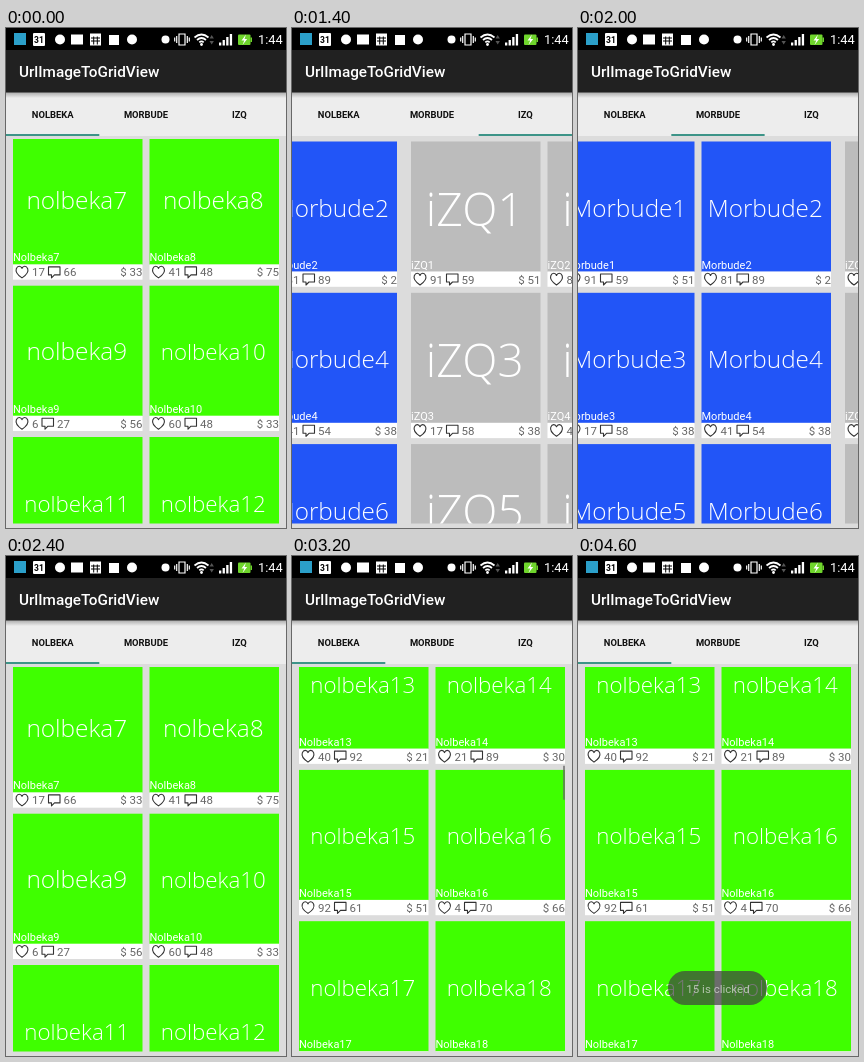
Animation, 280 px wide and 500 px high, one loop 4.8 s. Source, as an HTML page:

```html
<!DOCTYPE html>
<html lang="en">
<head>
<meta charset="utf-8">
<title>UrlImageToGridView</title>
<style>
  html, body { margin: 0; width: 100%; height: 100%; overflow: hidden; background: #dcdcdc; }
  svg { display: block; width: 100vw; height: 100vh; }
  text { font-family: Roboto, sans-serif; }
  .big { font-family: "Open Sans", "Noto Sans", sans-serif; font-weight: 300; fill: #fff; text-anchor: middle; }
  .cap { font-size: 11px; fill: #fff; }
  .stat { font-size: 11.5px; fill: #666; }
  .icon { fill: none; stroke: #333; stroke-width: 1.1; stroke-linejoin: round; }
  .tab { font-size: 9.4px; font-weight: 700; fill: #111; text-anchor: middle; }
</style>
</head>
<body>
<svg viewBox="0 0 280 500" preserveAspectRatio="none">
  <defs>
    <clipPath id="list"><rect y="111" width="280" height="384.5"/></clipPath>
    <linearGradient id="shade" x1="0" y1="0" x2="0" y2="1">
      <stop offset="0" stop-color="#a8a8a8"/>
      <stop offset="1" stop-color="#ededed"/>
    </linearGradient>
  </defs>
  <rect width="280" height="500" fill="#dcdcdc"/>
  <g clip-path="url(#list)">
    <g id="pages"></g>
    <rect id="bar" x="271" width="2" height="34" fill="#666"/>
  </g>

  <rect y="64" width="280" height="44" fill="#ededed"/>
  <rect y="64" width="280" height="6" fill="url(#shade)"/>
  <g id="tabs"></g>
  <rect id="mark" y="106" width="93.3" height="2" fill="#3d9488"/>

  <rect width="280" height="22" fill="#000"/>
  <rect y="22" width="280" height="42.5" fill="#212121"/>
  <text x="13" y="49" font-size="15.3" font-weight="500" fill="#fff">UrlImageToGridView</text>

  <g fill="#fff">
    <rect x="8" y="5" width="12" height="12" fill="#2b9fc9"/>
    <rect x="27" y="5" width="12" height="13" rx="1"/>
    <text x="33" y="15" font-size="8.5" font-weight="700" fill="#000" text-anchor="middle">31</text>
    <circle cx="54" cy="11.5" r="5"/>
    <rect x="65" y="6.5" width="12" height="10"/>
    <path d="M84 5.5h11v12h-11z"/>
    <path d="M85 10h9M85 13h9M87.7 8.5v8M91.3 8.5v8" stroke="#000" fill="none"/>
    <rect x="103" y="7" width="10" height="10"/>
    <circle cx="126" cy="11.5" r="5"/>
    <circle cx="159.5" cy="11.5" r="4"/>
    <path d="M173 6h6v11h-6zM170.7 8v7M181.3 8v7M168.7 9.5v4M183.3 9.5v4" fill="none" stroke="#fff" stroke-width="1.2"/>
    <path d="M188.5 9.5q7-6 14 0M191 12q4.500-4 9 0M193.300 14.300q2.200-2 4.400 0" fill="none" stroke="#fff" stroke-width="1.7"/>
    <circle cx="195.500" cy="16.500" r="1.400"/>
    <path d="M203.500 10.500l2.200-3.500 2.200 3.500zM203.500 13l2.200 3.500 2.200-3.500z" fill="#555"/>
    <path d="M213 14.500h2.300v3h-2.300zM216.600 12h2.300v5.500h-2.300zM220.200 9h2.300v8.500h-2.300zM223.800 6h2.300v11.500h-2.300z"/>
    <rect x="232" y="6.500" width="12.500" height="10.500" rx="1" fill="#6fd52c"/>
    <rect x="244.500" y="9.500" width="1.500" height="4.500" fill="#6fd52c"/>
    <path d="M240 6.500l-4.500 6h2.700l-1.700 4.500 4.700-6h-2.700z"/>
    <text x="252" y="16" font-size="12.8">1:44</text>
  </g>

  <g id="toast">
    <rect x="90" y="415" width="99" height="34" rx="17" fill="#424242" opacity=".72"/>
    <text x="140" y="436.500" font-size="11.500" fill="#eee" opacity=".65" text-anchor="middle">15 is clicked</text>
  </g>
</svg>
<script>
const $ = id => document.getElementById(id);
const LOOP = 4800, STEP = 200, W = 280, ROW = 151.3, TOP = 113.5, TILE = 129.5;

const kinds = [
  { name: 'nolbeka', fill: '#3fff00', count: 20, base: 74.5, size: n => n < 10 ? 24.4 : 22.3 },
  { name: 'Morbude', fill: '#2255f7', count: 6, base: 75.5, size: () => 24.3 },
  { name: 'iZQ', fill: '#bcbcbc', count: 6, base: 84, size: () => 46 }
];

// likes, comments, price
const stats = [
  [91, 59, 51], [81, 89, 2], [17, 58, 38], [41, 54, 38], [62, 35, 47], [28, 73, 19],
  [17, 66, 33], [41, 48, 75], [6, 27, 56], [60, 48, 33], [53, 14, 82], [37, 95, 64],
  [40, 92, 21], [21, 89, 30], [92, 61, 51], [4, 70, 66]
];

function tile(kind, i) {
  const n = i + 1, [likes, notes, price] = stats[i % stats.length];
  const x = 7 + (i % 2) * 136.5, y = TOP + Math.floor(i / 2) * ROW;
  const bubble = 22 + 6.5 * String(likes).length;
  const label = kind.name === 'nolbeka' ? 'Nolbeka' : kind.name;
  return `<g transform="translate(${x} ${y})">
    <rect width="${TILE}" height="130.3" fill="${kind.fill}"/>
    <text class="big" x="${TILE / 2 - 1}" y="${kind.base}" font-size="${kind.size(n)}">${kind.name}${n}</text>
    <text class="cap" y="127">${label}${n}</text>
    <rect y="130" width="${TILE}" height="15.3" fill="#fff"/>
    <path class="icon" d="M9 143.500C3 139.500 2.500 136.500 3.300 134.300C4.500 131 8 131 9 134C10 131 13.500 131 14.700 134.300C15.500 136.500 15 139.500 9 143.500z"/>
    <text class="stat" x="19" y="142">${likes}</text>
    <path class="icon" transform="translate(${bubble})" d="M.5 132.500h11.500v8h-5.500l-3 3v-3h-3z"/>
    <text class="stat" x="${bubble + 15.5}" y="142">${notes}</text>
    <text class="stat" x="${TILE}" y="142" text-anchor="end">$ ${price}</text>
  </g>`;
}

$('pages').innerHTML = kinds.map(k =>
  `<g>${Array.from({ length: k.count }, (_, i) => tile(k, i)).join('')}</g>`).join('');
$('tabs').innerHTML = kinds.map((k, i) =>
  `<text class="tab" x="${W / 6 * (2 * i + 1)}" y="90">${k.name.toUpperCase()}</text>`).join('');
const pages = [...$('pages').children];

// start time, page position, selected tab, scroll of the first page, scrollbar opacity
const REST = 461, END = 958.7;
const poses = [
  [0, 0, 0, REST, 0],
  [1200, 1, 1, REST, 0],
  [1400, 1.6, 2, REST, 0],
  [1600, 2, 2, REST, .6],
  [2000, 1 + 20 / W, 1, REST, 0],
  [2200, .4, 0, REST, 0],
  [2400, 0, 0, REST, 0],
  [2600, 0, 0, 570, .8],
  [2800, 0, 0, 790, .8],
  [3000, 0, 0, 920, .8],
  [3200, 0, 0, END, .7],
  [3400, 0, 0, END, .2],
  [3600, 0, 0, END, 0]
];

function draw(now) {
  const t = Math.floor(now % LOOP / STEP) * STEP;
  const [, page, tab, scroll, bar] = poses.filter(p => p[0] <= t).pop();
  pages.forEach((g, i) =>
    g.setAttribute('transform', `translate(${(i - page) * W} ${i ? 0 : -scroll})`));
  $('mark').setAttribute('x', tab * W / 3);
  $('bar').setAttribute('y', tab ? TOP : 111 + scroll * .103);
  $('bar').setAttribute('opacity', bar);
  $('toast').setAttribute('visibility', t >= 4600 ? 'visible' : 'hidden');
}

const start = performance.now();
function tick() {
  draw(performance.now() - start);
  requestAnimationFrame(tick);
}
tick();
</script>
</body>
</html>
```
